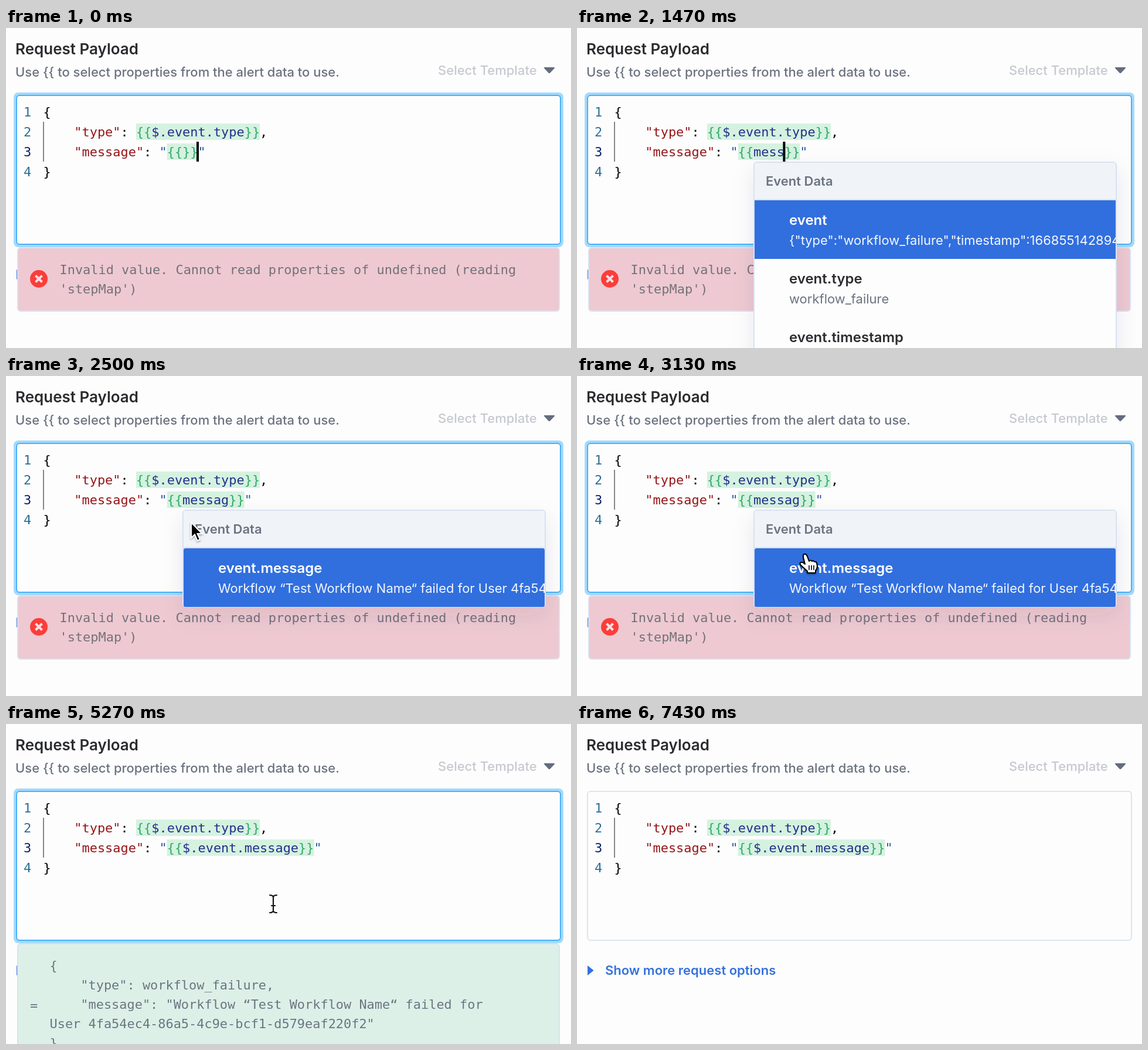
Write an HTML page that moves like this. It is 964 by 546 pixels and loops after 7.46 s.

```html
<!DOCTYPE html>
<html lang="en">
<head>
<meta charset="utf-8">
<title>Request payload editor</title>
<style>
html, body { margin: 0; width: 100%; height: 100%; overflow: hidden; background: #fdfdfd; }
svg { display: block; }
text { white-space: pre; font: 400 22px Inter, sans-serif; }
.medium { font-weight: 500; }
.bold { font-weight: 600; }
.big { font-weight: 600; font-size: 24px; }
.title { font-weight: 600; font-size: 26px; }
.mono { font: 21.93px "DejaVu Sans Mono", monospace; font-variant-ligatures: none; }
.hidden { display: none; }
</style>
</head>
<body>
<svg width="964" height="546" viewBox="0 0 964 546">
  <defs>
    <filter id="popShadow" x="-20%" y="-20%" width="140%" height="150%">
      <feDropShadow dx="0" dy="14" stdDeviation="18" flood-color="#30405c" flood-opacity=".09"/>
    </filter>
    <filter id="mouseShadow" x="-50%" y="-50%" width="200%" height="200%">
      <feDropShadow dx="0" dy="2" stdDeviation="1.5" flood-opacity=".35"/>
    </filter>
    <clipPath id="popClip"><rect x="303" y="230" width="616" height="330"/></clipPath>
  </defs>

  <text class="title" x="16" y="45" fill="#2b2c2f">Request Payload</text>
  <text class="medium" x="16" y="83" fill="#6b7280">Use {{ to select properties from the alert data to use.</text>
  <text class="medium" x="737" y="80" fill="#c6c9d0">Select Template</text>
  <path d="M919 67H935Q937 67 935.500 69L928.500 76.500Q927 78 925.500 76.500L918.500 69Q917 67 919 67Z" fill="#646d7d"/>

  <path d="M18 412L28.500 420.500L18 429Z" fill="#3571dc"/>
  <text class="bold" x="48" y="428" fill="#3571dc">Show more request options</text>

  <rect id="halo" x="13" y="110" width="938" height="264" rx="8" fill="#a4dafc"/>
  <rect id="box" x="18" y="115" width="928" height="254" rx="5" fill="#fdfdfd" stroke-width="2"/>
  <path d="M64 160V228" stroke="#868686" stroke-width="2"/>
  <g id="code"></g>

  <g id="error">
    <rect x="20" y="375" width="924" height="108" rx="5" fill="#eec9d1" stroke="#dce1f0" stroke-width="2"/>
    <circle cx="56" cy="428" r="15" fill="#fc3d39"/>
    <path d="M50.500 422.500L61.500 433.500M61.500 422.500L50.500 433.500" stroke="#f6dfe4" stroke-width="4"/>
    <g id="errorText" fill="#73727a"></g>
  </g>

  <g id="result">
    <rect x="20" y="375" width="924" height="200" rx="5" fill="#dcf0e8" stroke="#d8e2ee" stroke-width="2"/>
    <g id="resultText" fill="#6d7580"></g>
  </g>

  <g id="popup"></g>
  <rect id="caret" y="194" width="4" height="34" fill="#000"/>

  <g id="arrow" filter="url(#mouseShadow)">
    <path d="M0 0V26L6 20.500L10.500 31L15 29L10.500 19H18.500Z" fill="#000" stroke="#fff" stroke-width="2"/>
  </g>
  <g id="hand" filter="url(#mouseShadow)">
    <path d="M-2 2Q-1 -1 2 0Q4 1 5 4L8 12Q10 9 13 12Q15 10 17 13Q20 12 21 15L22 20Q22 25 19 28V32H5V29L-6 19Q-9 15 -6 14Q-3 13 1 17L-2 5Z"
      fill="#fff" stroke="#000" stroke-width="2" stroke-linejoin="round"/>
    <path d="M8 19V27M12 19V27M16 19V27" stroke="#000" stroke-width="1.600"/>
  </g>
  <g id="beam" fill="none" stroke-linecap="round">
    <path id="beamPath" d="M-6 -15Q0 -15 0 -11Q0 -15 6 -15M0 -11V11M-6 15Q0 15 0 11Q0 15 6 15M-3 3H3" stroke="#fff" stroke-width="4.500"/>
    <path d="M-6 -15Q0 -15 0 -11Q0 -15 6 -15M0 -11V11M-6 15Q0 15 0 11Q0 15 6 15M-3 3H3" stroke="#111" stroke-width="2.200"/>
  </g>
</svg>
<script>
const LOOP = 7460, LEFT = 63.5, CELL = 13.2;
const KEY = '#951619', NAVY = '#22308c', GREEN = '#2fa968', BLUE = '#2c59a0';
const MESSAGE = 'Workflow “Test Workflow Name“ failed for';
const USER = 'User 4fa54ec4-86a5-4c9e-bcf1-d579eaf220f2';

// Times of the interactions, in ms
const KEYS = [1130, 1240, 1340, 1440, 1530, 1610];
const LEFT_ONE = 380, LEFT_TWO = 520, OPEN = 640, FILTER = 1760, PICK = 3550, BLUR = 5860;
const PATH = [
  [2380, 300, 222], [2500, 316, 250], [2900, 382, 298], [3100, 388, 304], [3550, 388, 305],
  [3800, 389, 314], [4750, 389, 314], [5150, 456, 307], [5400, 456, 307], [5740, 482, 585]
];

const $ = id => document.getElementById(id);
const show = (id, on) => $(id).classList.toggle('hidden', !on);
const label = (x, y, text, fill, cls = '') =>
  `<text class="${cls}" x="${x}" y="${y}"${fill ? ` fill="${fill}"` : ''}>${text}</text>`;
const mono = (x, y, text, fill) => label(x, y, text, fill, 'mono');

// Runs of [text, colour] placed on the character grid
function codeLine(row, runs, col = 4) {
  return runs.map(([text, fill]) => {
    const out = mono(LEFT + col * CELL, 151 + row * 34, text, fill);
    col += text.length;
    return out;
  }).join('');
}

function template(row, col, inner) {
  const width = (inner.length + 4) * CELL;
  return `<rect x="${LEFT + col * CELL}" y="${129 + row * 34}" width="${width}" height="28" fill="#d5f2e0"/>`
    + codeLine(row, [['{{', GREEN], [inner, NAVY], ['}}', GREEN]], col);
}

function code(value) {
  const numbers = [1, 2, 3, 4].map(n =>
    mono(30, 117 + n * 34, n, n === 3 ? '#0b216f' : '#2a6f96')).join('');
  return numbers
    + codeLine(0, [['{', '#000']], 0)
    + codeLine(1, [['"type"', KEY], [': ', '#000']])
    + template(1, 12, '$.event.type') + codeLine(1, [[',', '#000']], 28)
    + codeLine(2, [['"message"', KEY], [': ', '#000'], ['"', BLUE]])
    + template(2, 16, value) + codeLine(2, [['"', BLUE]], 20 + value.length)
    + codeLine(3, [['}', '#000']], 0);
}

function popup(filtered) {
  const rows = filtered
    ? [['event.message', `${MESSAGE} ${USER}`]]
    : [['event', '{"type":"workflow_failure","timestamp":1668551428940}'],
       ['event.type', 'workflow_failure'],
       ['event.timestamp', '1668551428940']];
  const height = filtered ? 165 : 340;
  const items = rows.map(([name, value], i) =>
    label(362, 336 + i * 100, name, i ? '#2b2c2f' : '#fff', 'big')
    + label(362, 370 + i * 100, value, i ? '#6b7280' : '#f4f7fd')).join('');
  return `<rect x="302" y="229" width="618" height="${height}" rx="5" fill="#fdfdfd" stroke="#d8e2f2" stroke-width="2" filter="url(#popShadow)"/>
    <path d="M303 293V234Q303 230 307 230H915Q919 230 919 234V293Z" fill="#f0f4f8"/>
    <path d="M303 293H919" stroke="#d8e2f2" stroke-width="2"/>
    <rect x="303" y="294" width="616" height="100" rx="${filtered ? 3 : 0}" fill="#316fdf"/>
    ${label(322, 269, 'Event Data', '#6b7280', 'bold')}
    <g clip-path="url(#popClip)">${items}</g>`;
}

$('errorText').innerHTML =
  mono(91.5, 420, 'Invalid value. Cannot read properties of undefined (reading')
  + mono(91.5, 453, "'stepMap')");
$('resultText').innerHTML = mono(41, 488, '=')
  + ['{', '    "type": workflow_failure,', `    "message": "${MESSAGE}`, `${USER}"`, '}']
    .map((line, i) => mono(74.5, 420 + i * 33, line)).join('');

// Rebuild markup only when its input changes
const cache = {};
function fill(id, key, make) {
  if (cache[id] === key) return;
  cache[id] = key;
  $(id).innerHTML = make(key);
}

function mouseAt(t) {
  const i = PATH.findIndex(p => p[0] > t);
  if (i < 1) return null;
  const [t0, x0, y0] = PATH[i - 1], [t1, x1, y1] = PATH[i];
  const u = (t - t0) / (t1 - t0), e = u * u * (3 - 2 * u);
  return [x0 + (x1 - x0) * e, y0 + (y1 - y0) * e];
}

function draw(now) {
  const t = now % LOOP;
  const typed = KEYS.filter(k => t >= k).length;
  const picked = t >= PICK, focused = t < BLUR, open = t >= OPEN && !picked;
  const value = picked ? '$.event.message' : 'messag'.slice(0, typed);

  show('halo', focused);
  $('box').setAttribute('stroke', focused ? '#4bb0f8' : '#dbe4f1');
  fill('code', value, code);
  show('error', !picked);
  show('result', picked && focused);
  show('popup', open);
  fill('popup', t >= FILTER, popup);

  const col = picked ? 35 : t < LEFT_ONE ? 20 : t < LEFT_TWO ? 19 : 18 + typed;
  const last = [0, LEFT_ONE, LEFT_TWO, ...KEYS, PICK].filter(k => t >= k).pop();
  $('caret').setAttribute('x', LEFT + col * CELL - 2.5);
  show('caret', focused && (t - last) % 1000 < 500);

  const mouse = mouseAt(t);
  let kind = '';
  if (mouse) {
    const [x, y] = mouse;
    if (open && x > 302 && y > 229) kind = y > 294 ? 'hand' : 'arrow';
    else kind = y < 370 ? 'beam' : 'arrow';
    $(kind).setAttribute('transform', `translate(${x} ${y})`);
  }
  for (const id of ['arrow', 'hand', 'beam']) show(id, id === kind);
}

function tick() {
  draw(performance.now());
  requestAnimationFrame(tick);
}
tick();
</script>
</body>
</html>
```
